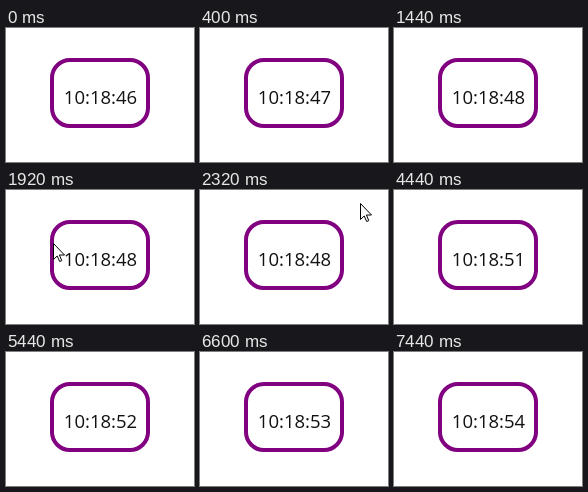
An HTML page for the animation above (7.96 s loop, 188 px wide and 134 px high).

```html
<!DOCTYPE html>
<html lang="en">
<head>
<meta charset="utf-8">
<title>Clock</title>
<style>
  html, body { margin: 0; width: 100%; height: 100%; overflow: hidden; background: #fff; }
  svg { display: block; }
  text { font: 18.5px "Open Sans", "Noto Sans", sans-serif; fill: #111; text-anchor: middle; }
</style>
</head>
<body>
<svg width="188" height="134" viewBox="0 0 188 134">
  <rect x="46" y="32" width="96" height="66" rx="18" fill="#fff" stroke="purple" stroke-width="4"/>
  <text id="clock" x="94.5" y="76">10:18:46</text>
  <path id="pointer" d="M.5 .5V16.5L4.2 13L6.7 18.5L8.8 17.6L6.4 12H11.5Z" fill="#fff" stroke="#000" visibility="hidden"/>
</svg>
<script>
  const LOOP = 7960, STEP = 40;
  const clock = document.getElementById('clock');
  const pointer = document.getElementById('pointer');

  // Quick pointer sweeps: start time, then one position per step
  const sweeps = [
    [1320, [104, 36]],
    [1880, [0, 57], [47, 53], [172, 36]],
    [2280, [177, 18], [160, 13], [80, 34]],
  ];

  function pointerAt(time) {
    for (const [start, ...points] of sweeps) {
      const point = points[(time - start) / STEP];
      if (point) return point;
    }
  }

  function draw() {
    const time = Math.floor(performance.now() % LOOP / STEP) * STEP;
    clock.textContent = '10:18:' + (46 + Math.floor((time + 625) / 1005));

    const point = pointerAt(time);
    pointer.setAttribute('visibility', point ? 'visible' : 'hidden');
    if (point) pointer.setAttribute('transform', `translate(${point})`);
    requestAnimationFrame(draw);
  }
  draw();
</script>
</body>
</html>
```
